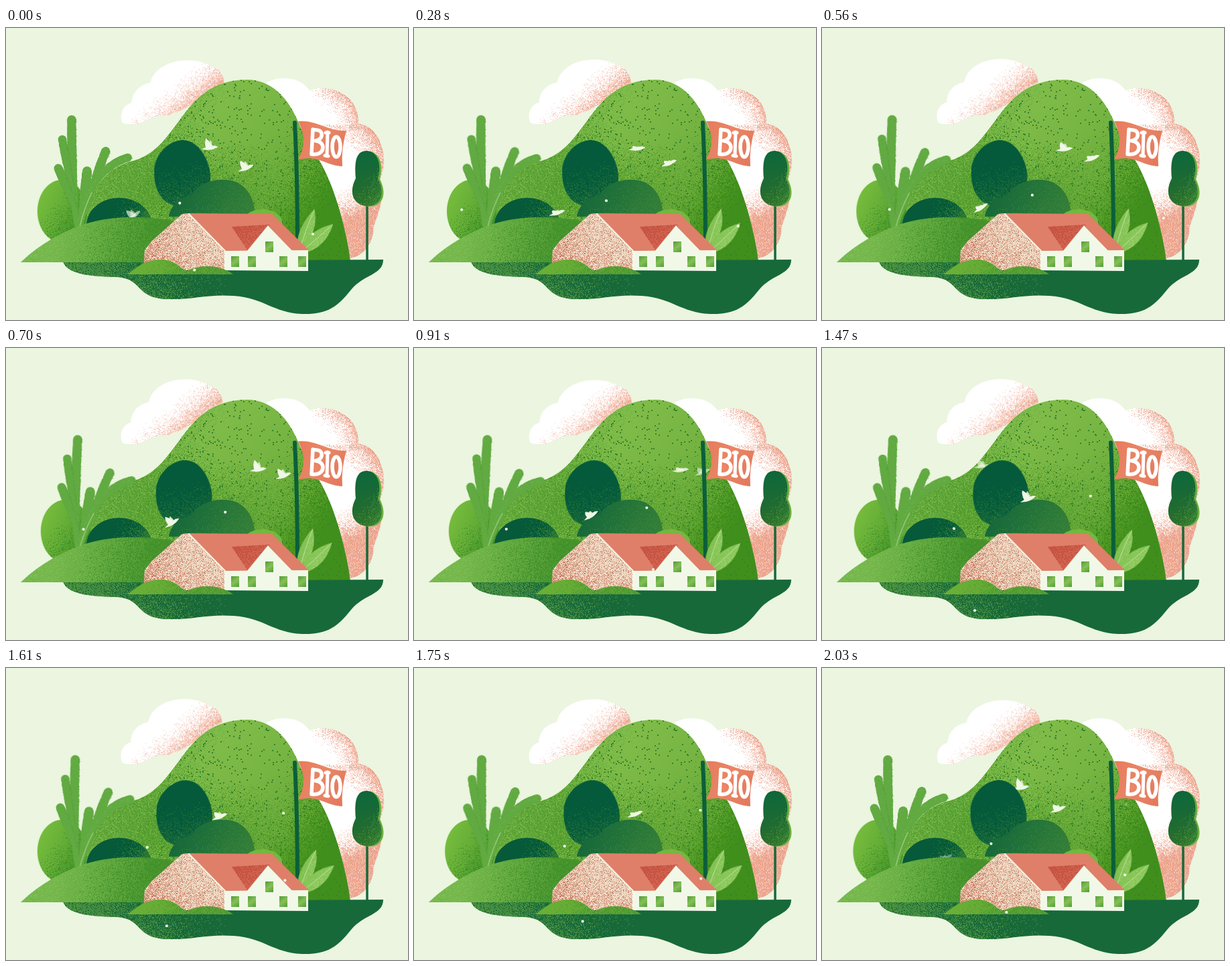
Write an HTML page with a canvas that moves like this. It is 600x435 px and loops after 2.1 s.

```html
<!DOCTYPE html>
<html lang="en">
<head>
<meta charset="utf-8">
<title>Bio farm</title>
<style>
  html, body { margin: 0; width: 100%; height: 100%; overflow: hidden; background: #ebf5df; }
  canvas { display: block; }
</style>
</head>
<body>
<canvas id="stage" width="600" height="435" role="img" aria-label="Farm with a flag reading BIO"></canvas>
<script>
const LOOP = 2100, STEP = 70, W = 600, H = 435, TAU = 2 * Math.PI;
const ctx = document.getElementById('stage').getContext('2d');

let seed = 7;
function rnd() {
  seed = (seed + 0x6d2b79f5) | 0;
  let r = Math.imul(seed ^ (seed >>> 15), 1 | seed);
  r = (r + Math.imul(r ^ (r >>> 7), 61 | r)) ^ r;
  return ((r ^ (r >>> 14)) >>> 0) / 4294967296;
}
const clamp = v => Math.max(0, Math.min(1, v));

function layer(paint) {
  const c = document.createElement('canvas');
  c.width = W; c.height = H;
  paint(c.getContext('2d'));
  return c;
}

function lin(x0, y0, x1, y1, ...colors) {
  const g = ctx.createLinearGradient(x0, y0, x1, y1);
  colors.forEach((c, i) => g.addColorStop(i / (colors.length - 1), c));
  return g;
}

function oval(cx, cy, rx, ry) {
  const a = rx * .552, b = ry * .552;
  return `M${cx - rx} ${cy}C${cx - rx} ${cy - b} ${cx - a} ${cy - ry} ${cx} ${cy - ry}` +
    `C${cx + a} ${cy - ry} ${cx + rx} ${cy - b} ${cx + rx} ${cy}` +
    `C${cx + rx} ${cy + b} ${cx + a} ${cy + ry} ${cx} ${cy + ry}` +
    `C${cx - a} ${cy + ry} ${cx - rx} ${cy + b} ${cx - rx} ${cy}Z`;
}

// Grain densities: along a line, or by distance from a centre
const ramp = (x0, y0, x1, y1, k = 1, top = 1) => (x, y) => {
  const dx = x1 - x0, dy = y1 - y0;
  return top * clamp(((x - x0) * dx + (y - y0) * dy) / (dx * dx + dy * dy)) ** k;
};
const ring = (cx, cy, r0, r1, k = 1, top = 1) => (x, y) =>
  top * clamp((Math.hypot(x - cx, y - cy) - r0) / (r1 - r0)) ** k;
const flat = d => () => d;

// Fills a path, then scatters grains of [color, density per pixel, size]
function shape(g, d, fill, ...grains) {
  const path = new Path2D(d), nums = d.match(/-?[\d.]+/g).map(Number);
  const span = odd => nums.filter((n, i) => i % 2 === odd);
  const xs = span(0), ys = span(1);
  g.fillStyle = fill;
  g.fill(path);
  g.save();
  g.clip(path);
  for (const [color, density, size = 1] of grains) {
    g.fillStyle = color;
    for (let y = Math.floor(Math.min(...ys)); y < Math.max(...ys); y++)
      for (let x = Math.floor(Math.min(...xs)); x < Math.max(...xs); x++)
        if (rnd() < density(x, y)) g.fillRect(x, y, size, size);
  }
  g.restore();
}

function line(g, d, color, width) {
  g.strokeStyle = color;
  g.lineWidth = width;
  g.lineCap = g.lineJoin = 'round';
  g.stroke(new Path2D(d));
}

// Tapered stem with a rough edge
function limb(g, x0, y0, cx, cy, x1, y1, r) {
  for (let i = 0; i <= 90; i++) {
    const s = i / 90, q = 1 - s;
    const x = q * q * x0 + 2 * q * s * cx + s * s * x1;
    const y = q * q * y0 + 2 * q * s * cy + s * s * y1;
    const rad = r * (.45 + .55 * Math.min(1, s * 1.4)) + rnd() * .8;
    g.fillStyle = '#62aa42';
    g.beginPath();
    g.arc(x, y, rad, 0, TAU);
    g.fill();
    for (let k = 0; k < 6; k++) {
      g.fillStyle = k < 3 ? '#4f9c36' : '#78b955';
      g.fillRect(x + (rnd() - (k < 3 ? .3 : .7)) * rad * 1.5, y + (rnd() - .5) * 3, 1, 1);
    }
  }
}

const PINK = 'rgba(238,160,135,.5)', CORAL = 'rgba(230,135,105,.6)';

const leftCloud = layer(g => shape(g,
  'M172 136C170 122 178 113 187 111C187 95 198 84 214 81C217 62 240 47 268 47C288 47 300 53 305 57C316 58 323 68 324 82C300 88 285 118 240 130C220 127 205 146 180 143C174 142 172 140 172 136Z',
  '#fff',
  [PINK, ramp(235, 88, 266, 126, 1.5)],
  [CORAL, ramp(242, 98, 268, 128, 2, .6)]));

const hill = layer(g => {
  const upper = ring(462, 148, 28, 68, 1.6), lower = ring(488, 206, 30, 80, 1.6);
  const shade = (x, y) => (y < 144 ? upper : lower)(x, y) * clamp((x - 450) / 40);
  shape(g, 'M388 82C405 70 440 72 453 93C485 82 528 100 526 143C560 145 575 200 555 232C570 260 548 285 548 305C545 325 530 342 512 343L440 300L400 120Z',
    '#fff', [PINK, shade], [CORAL, (x, y) => .8 * shade(x, y) ** 2]);
  shape(g, 'M104 349C106 300 122 213 190 198C262 178 260 77 360 77C396 77 420 104 434 135C447 168 470 195 483 229C496 260 510 312 514 349Z',
    lin(330, 100, 505, 270, '#7fbb49', '#77b543', '#68aa38', '#418f17'),
    ['#4f9a2a', (x, y) => .8 * (1 - ring(225, 240, 15, 120)(x, y))],
    ['#559d2f', (x, y) => .6 * (1 - ring(340, 255, 15, 90)(x, y))],
    ['#408f1c', ramp(400, 185, 495, 225, 1.6)],
    ['#5fa53a', ramp(310, 150, 240, 118, 1.5, .6)],
    ['#36832a', (x, y) => .011 * clamp((x - 215) / 40), 2]);
});

const bush = layer(g => shape(g, oval(83, 273, 37, 47),
  lin(50, 260, 118, 290, '#74bb3c', '#62ab36', '#459528'),
  ['#3c8f24', ramp(68, 258, 118, 305, 1.5, .8)]));

const cactus = layer(g => {
  limb(g, 108, 305, 98, 255, 98, 137, 6.5);
  limb(g, 102, 250, 92, 215, 84, 166, 5.5);
  limb(g, 104, 270, 92, 240, 78, 209, 6);
  limb(g, 110, 304, 116, 260, 121, 213, 6.5);
  limb(g, 114, 285, 130, 230, 149, 183, 6);
  limb(g, 114, 275, 134, 207, 182, 193, 5.5);
  line(g, 'M109 300Q116 270 128 245', '#9bcc7a', 1.5);
});

const tealBush = layer(g => shape(g, oval(169, 294, 49, 41), '#065a3a',
  ['#2d7934', ramp(160, 262, 205, 292, 1.8)]));

const darkTree = layer(g => shape(g,
  'M264 167C288 167 305 200 305 222C305 245 285 265 258 265C235 265 220 243 221 212C221 192 240 167 264 167Z',
  '#045a3a', ['#27733a', ramp(255, 195, 275, 275, 1.8, .9)]));

const roundTree = layer(g => shape(g,
  'M243 281C246 262 262 252 277 249C285 234 303 226 325 226C352 226 371 245 372 282Z',
  lin(255, 240, 370, 270, '#17693a', '#23733a', '#2f7c36'),
  ['#35803a', ramp(290, 235, 330, 285, 1.5, .6)]));

const flag = layer(g => {
  shape(g, oval(383, 289, 29, 19), '#74b83e');
  line(g, 'M431 141Q435 220 435 325', '#0b5f3a', 6);
  shape(g, 'M436 139C462 136 480 154 508 153Q500 180 502 206C478 205 466 189 436 196Q452 168 436 139Z',
    lin(435, 150, 507, 185, '#e67c5d', '#ea8566', '#e2795c'));
  line(g, 'M458 151L456 188M458 152C475 149 475 166 462 168C478 169 477 191 456 188', '#fff', 5.5);
  line(g, 'M480 155L479 190M477 156L482 156M476 190L481 191', '#fff', 5);
  line(g, oval(493, 177, 6, 15), '#fff', 5.5);
});

const leaves = layer(g => {
  shape(g, 'M436 334C430 308 446 284 460 270C465 292 457 318 436 334Z', '#82c152',
    ['#97d069', ramp(442, 300, 460, 305, 1, .6)]);
  shape(g, 'M438 336C446 310 465 297 488 292C480 317 464 333 438 336Z', '#86c455',
    ['#9bd36f', ramp(455, 308, 475, 327, 1, .6)]);
  line(g, 'M438 333Q446 302 460 271M439 335Q459 318 487 293', '#c2e5a5', 1);
});

function house(g) {
  shape(g, 'M206 352L207 331L217 318L263 277L275 276L328 330L328 361L206 361Z', '#f0dfca',
    ['#dba68c', flat(.35)],
    ['#cf846c', ramp(275, 310, 206, 325, 1.5, .4)],
    ['#cf846c', ramp(280, 325, 275, 362, 1.5, .35)],
    ['#c0705c', flat(.06)]);
  shape(g, 'M326 331L451 331L451 362L326 361Z', '#f1f8e8');
  shape(g, 'M273 276L397 277L452 331L327 332Z', '#df7f69');
  shape(g, 'M337 296L394 293L361 332Z', '#d2614e', ['#bd4e3d', ramp(375, 325, 350, 297, 1, .6)]);
  shape(g, 'M391 294L428 332L359 333Z', '#f1f8e8');
  line(g, 'M273 277L327 332', '#f4f3e4', 2);
  line(g, 'M393 295L427 330', '#df7f69', 2);
  for (const x of [336, 361, 387, 408, 436]) {
    const y = x === 387 ? 318 : 340;
    g.fillStyle = lin(x, y, x + 12, y + 16, '#519c39', '#86bf58', '#519c39');
    g.fillRect(x, y, 12, 16);
  }
}

const front = layer(g => {
  shape(g, 'M85 348L563 345C563 368 535 366 515 390C495 415 480 427 442 426C398 424 385 402 340 399C300 396 280 405 240 404C192 402 205 373 165 371C130 370 92 368 85 348Z',
    '#17693a',
    ['#4d9340', ramp(330, 350, 145, 385, 1.3, .55)],
    ['#4a903e', (x, y) => ramp(240, 374, 225, 410, 1.5, .5)(x, y) * clamp((340 - x) / 60)]);
  shape(g, 'M22 349C50 322 100 290 155 284C190 280 225 282 262 290L230 349Z',
    lin(70, 310, 235, 330, '#74b64a', '#62aa40', '#4f9a32'),
    ['#42912a', ramp(105, 292, 215, 325, 1.7, .8)],
    ['#80c058', ramp(160, 320, 60, 328, 2, .3)]);
  house(g);
  shape(g, 'M181 367C200 353 210 344 235 345C255 347 258 357 270 362C290 352 318 352 339 367Z',
    lin(185, 350, 335, 365, '#6ab035', '#5da435'),
    ['#4c9632', ramp(210, 344, 255, 370, 2, .5)]);
  line(g, 'M539 348L539 245', '#17693a', 3.5);
  const crown = 'M538 183C556 183 561 206 555 224C567 248 558 265 540 265C520 265 510 247 522 224C520 200 522 183 538 183Z';
  g.save();
  g.translate(3, 1);
  shape(g, crown, '#69ae3e');
  g.restore();
  shape(g, crown, lin(535, 190, 545, 262, '#0f683a', '#1c6a34', '#2c6f28'),
    ['#3f8939', ramp(535, 215, 565, 240, 2, .6)]);
});

// Key points of [ms, x, y]; a path may run past one loop
const highBird = [[1330, 224, 174], [3220, 419, 181]];
const lowBird = [[-140, 178, 288], [0, 189, 279], [500, 231, 270], [1300, 293, 228], [3150, 441, 180]];
const highSeed = [[70, 49, 271], [1470, 197, 269], [2400, 289, 257], [4200, 461, 201]];
const lowSeed = [[1190, 206, 397], [1470, 228, 391], [2380, 305, 347], [3010, 357, 330], [4200, 458, 307], [5000, 532, 273]];

function follow(path, t, draw) {
  const start = path[0][0], end = path[path.length - 1][0];
  for (let u = t - LOOP; u <= end; u += LOOP) {
    if (u < start) continue;
    const i = Math.max(1, path.findIndex(p => p[0] >= u));
    const [t0, x0, y0] = path[i - 1], [t1, x1, y1] = path[i];
    const s = (u - t0) / (t1 - t0);
    ctx.save();
    ctx.globalAlpha = clamp(Math.min(u - start + 20, end - u) / 250);
    ctx.translate(x0 + (x1 - x0) * s, y0 + (y1 - y0) * s);
    draw(Math.atan2(y1 - y0, x1 - x0));
    ctx.restore();
  }
}

const wave = (t, peak, period = LOOP) => Math.cos((t - peak) / period * TAU);

const bird = (t, peak) => heading => {
  const lift = 2 + 11 * ((1 + wave(t, peak, LOOP / 3)) / 2) ** 2;
  ctx.rotate(heading * .7);
  ctx.fillStyle = '#d3e8c2';
  ctx.fill(new Path2D(`M-4 2Q-2 ${-lift * .5} 2 ${-lift * .8}Q6 -1 5 3Z`));
  ctx.fillStyle = '#eff7e6';
  ctx.fill(new Path2D('M-12 4Q-4 0 4 -1Q9 -3 13 0Q5 5 -3 5Z'));
  ctx.fill(new Path2D(`M-5 3Q-8 ${-lift * .5} -5 ${-lift}Q2 ${-lift * .5} 5 2Z`));
};

function dot() {
  ctx.fillStyle = '#f1f9e9';
  ctx.beginPath();
  ctx.arc(0, 0, 2.1, 0, TAU);
  ctx.fill();
}

function spin(image, x, y, angle) {
  ctx.save();
  ctx.translate(x, y);
  ctx.rotate(angle);
  ctx.drawImage(image, -x, -y);
  ctx.restore();
}

function render(t) {
  ctx.fillStyle = '#ebf5df';
  ctx.fillRect(0, 0, W, H);

  const swell = wave(t, LOOP / 4, LOOP / 2);
  ctx.save();
  ctx.translate(250, 140);
  ctx.transform(1, 0, .025 * swell, 1 + .01 * swell, 0, 0);
  ctx.drawImage(leftCloud, -250, -140);
  ctx.restore();

  ctx.drawImage(hill, 0, 0);
  ctx.drawImage(bush, 3 + 3 * wave(t, 805), 0);
  spin(cactus, 108, 302, .036 * (1 - wave(t, 0)));
  ctx.drawImage(tealBush, 0, 0);
  follow(highBird, t, bird(t, -35));
  spin(darkTree, 262, 275, .045 * (1 + wave(t, 1200)));
  ctx.drawImage(roundTree, 0, 0);
  follow(lowBird, t, bird(t, 70));
  ctx.drawImage(flag, 0, 0);
  spin(leaves, 438, 333, -.04 * wave(t, 560));
  ctx.drawImage(front, 0, 0);
  follow(highSeed, t, dot);
  follow(lowSeed, t, dot);
}

const begin = performance.now();
function tick() {
  const t = (performance.now() - begin) % LOOP;
  render(Math.floor(t / STEP) * STEP);
  requestAnimationFrame(tick);
}
tick();
</script>
</body>
</html>
```
